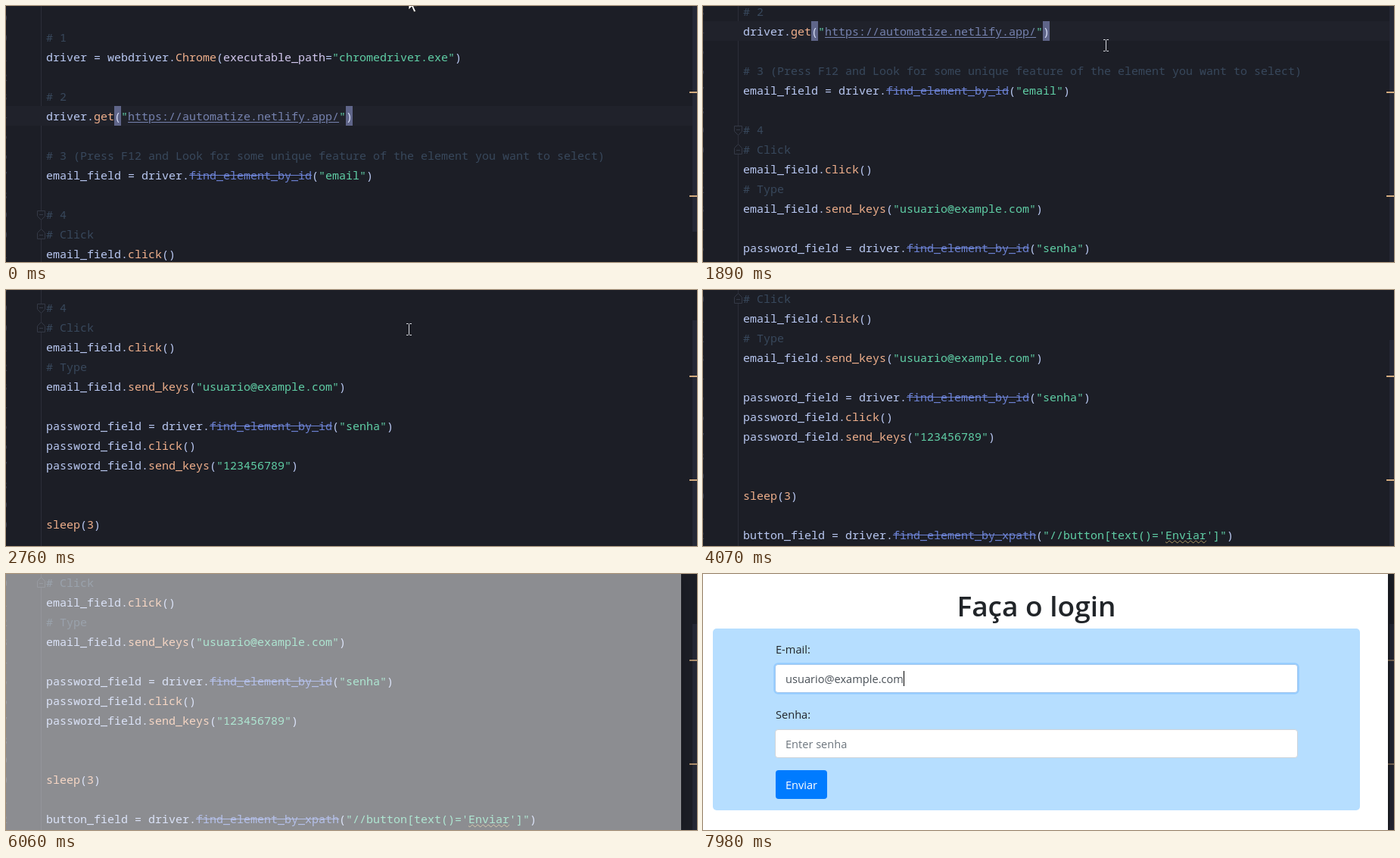
These frames come from a looping animation (913x338 px, 8 s). An HTML page:

```html
<!DOCTYPE html>
<html lang="pt">
<head>
<meta charset="utf-8">
<title>Code editor and login form</title>
<style>
  html, body { margin: 0; width: 100%; height: 100%; overflow: hidden; background: #1c1e26; }
  #stage { position: relative; width: 913px; height: 338px; overflow: hidden; }
  #stage div, pre, svg { position: absolute; box-sizing: border-box; }
  svg { overflow: visible; }
  pre { margin: 0; top: 2px; left: 53px; font: 15px/26px "Noto Sans Mono", monospace; color: #b9c8f2; }
  pre * { font-style: normal; font-weight: normal; }
  pre i { color: #38485c; }
  pre b { color: #f0b08c; }
  pre em { color: #60cfa6; }
  pre var { color: #d3c9ef; }
  pre s { color: #6c82d4; }
  pre u { color: #7683b0; text-underline-offset: 2px; }
  pre mark { display: inline-block; height: 26px; vertical-align: top; background: #5f6589; color: #d5dcf5; }
  pre .typo { text-decoration: underline wavy #b09a62 1px; }
  #numbers { left: -7px; color: #3b4050; }
  #row { top: 132px; width: 907px; height: 26px; background: #20222b; }
  #rail { left: 46px; width: 1px; height: 338px; background: #2b2e39; }
  #thumb { left: 907px; width: 6px; height: 432px; background: #252835; }
  .marker { left: 903px; width: 10px; height: 2px; background: #d3ab7e; }
  #page { left: -20px; height: 338px; background: #fff; box-shadow: 0 0 20px rgba(0,0,0,.45); }
  #form { left: 20px; width: 905px; height: 338px; font: 14.6px/24px "Open Sans", sans-serif; color: #212529; white-space: nowrap; }
  #title { left: 13px; top: 18px; width: 855px; font-size: 37px; font-weight: 600; line-height: 48px; text-align: center; }
  #panel { left: 13px; top: 72px; width: 855px; height: 240px; border-radius: 5px; background: #b6deff; }
  .label { left: 96px; }
  .field { left: 95px; width: 691px; height: 38px; padding-left: 13px; line-height: 36px; border: 1px solid #ced4da; border-radius: 4px; background: #fff; color: #495057; }
  #typed { border-right: 1px solid #000; display: inline-block; line-height: 20px; }
  #send { left: 96px; top: 259px; width: 68px; height: 38px; line-height: 38px; border-radius: 4px; background: #007bff; color: #fff; text-align: center; }
</style>
</head>
<body>
<div id="stage">
  <div id="rail"></div>
  <div id="scroll">
    <div id="row"></div>
    <pre id="numbers"></pre>
    <svg width="1" height="1" fill="#1c1e26" stroke="#343946">
      <path d="M41.5 270.5h10v7l-5 5l-5-5zM44 275.5h5M41.5 307.5h10v-8l-5-5l-5 5zM44 302.5h5"/>
    </svg>
    <pre>

<i># 1</i>
driver = webdriver.<b>Chrome</b>(<var>executable_path</var>=<em>"chromedriver.exe"</em>)

<i># 2</i>
driver.<b>get</b><mark>(</mark><em>"<u>https://automatize.netlify.app/</u>"</em><mark>)</mark>

<i># 3 (Press F12 and Look for some unique feature of the element you want to select)</i>
email_field = driver.<s>find_element_by_id</s>(<em>"email"</em>)

<i># 4</i>
<i># Click</i>
email_field.<b>click</b>()
<i># Type</i>
email_field.<b>send_keys</b>(<em>"usuario@example.com"</em>)

password_field = driver.<s>find_element_by_id</s>(<em>"senha"</em>)
password_field.<b>click</b>()
password_field.<b>send_keys</b>(<em>"123456789"</em>)


<b>sleep</b>(<b>3</b>)

button_field = driver.<s>find_element_by_xpath</s>(<em>"//button[text()='<span class="typo">Enviar</span>']"</em>)
</pre>
  </div>
  <div id="thumb"></div>
  <div class="marker" style="top:113px"></div>
  <div class="marker" style="top:250px"></div>
  <svg id="cursor" width="1" height="1">
    <path id="arrow" d="M0 0v16l4-4 3 7 2.5-1-3-6.500h5z" fill="#fff" stroke="#111" stroke-width=".7"/>
    <path id="beam" d="M-3 -7.500h2.500l1 1l1-1h2.500M.5 -6.500v13M-3 7.500h2.500l1-1l1 1h2.500" fill="none" stroke="#d8dae0"/>
  </svg>
  <div id="page">
    <div id="form">
      <div id="title">Faça o login</div>
      <div id="panel"></div>
      <div class="label" style="top:87px">E-mail:</div>
      <div class="field" id="email" style="top:119px"><span id="typed">usuario@example.com</span></div>
      <div class="label" style="top:173px">Senha:</div>
      <div class="field" style="top:205px;color:#6c757d">Enter senha</div>
      <div id="send">Enviar</div>
    </div>
  </div>
</div>
<script>
const LOOP = 8000;
const $ = id => document.getElementById(id);
const show = (el, on) => { el.style.visibility = on ? "visible" : "hidden"; };
const move = (el, x, y) => { el.style.transform = `translate(${x}px, ${y}px)`; };
const progress = (t, start, length) => Math.min(1, Math.max(0, (t - start) / length));
const smooth = p => p * p * (3 - 2 * p);
// Quick start, gentle stop
const glide = p => p * (1.31 + p * (0.38 - 0.69 * p));
const markers = document.querySelectorAll(".marker");

$("numbers").textContent = Array.from({ length: 26 }, (_, i) => (i + 9) % 10).join("\n");

function drawEditor(t) {
  const turns = [1360, 1835, 2550].reduce((sum, start) => sum + glide(progress(t, start, 470)), 0);
  const scroll = Math.round(turns * 290 / 3);
  move($("scroll"), 0, -scroll);
  move($("thumb"), 0, Math.round(scroll * 0.69) - 134);
}

function drawCursor(t) {
  const enter = smooth(progress(t, 570, 570));
  const leave = progress(t, 3840, 230) ** 2;
  const isArrow = t < 570;
  show($("arrow"), isArrow);
  show($("beam"), !isArrow && t < 4070);
  if (isArrow) move($("cursor"), 532, -11);
  else move($("cursor"), Math.round(532 - 190 * leave), Math.round(-8 + 60 * enter + 293 * leave));
}

function drawPage(t) {
  const open = 1 - (1 - progress(t, 6000, 250)) ** 2;
  show($("page"), t >= 6000);
  $("page").style.width = 903 + 22 * open + "px";
  $("page").style.opacity = 0.115 + 0.885 * open;
  for (const marker of markers) marker.style.opacity = 1 - 0.5 * open;

  show($("form"), t >= 7780);
  show($("typed"), t >= 7980);
  const focus = progress(t, 7900, 150);
  $("email").style.borderColor = `color-mix(in srgb, #80bdff ${focus * 100}%, #ced4da)`;
  $("email").style.boxShadow = `0 0 0 ${3.2 * focus}px rgba(0,123,255,${0.25 * Math.sqrt(focus)})`;
}

function frame() {
  const t = performance.now() % LOOP;
  drawEditor(t);
  drawCursor(t);
  drawPage(t);
  requestAnimationFrame(frame);
}
frame();
</script>
</body>
</html>
```
